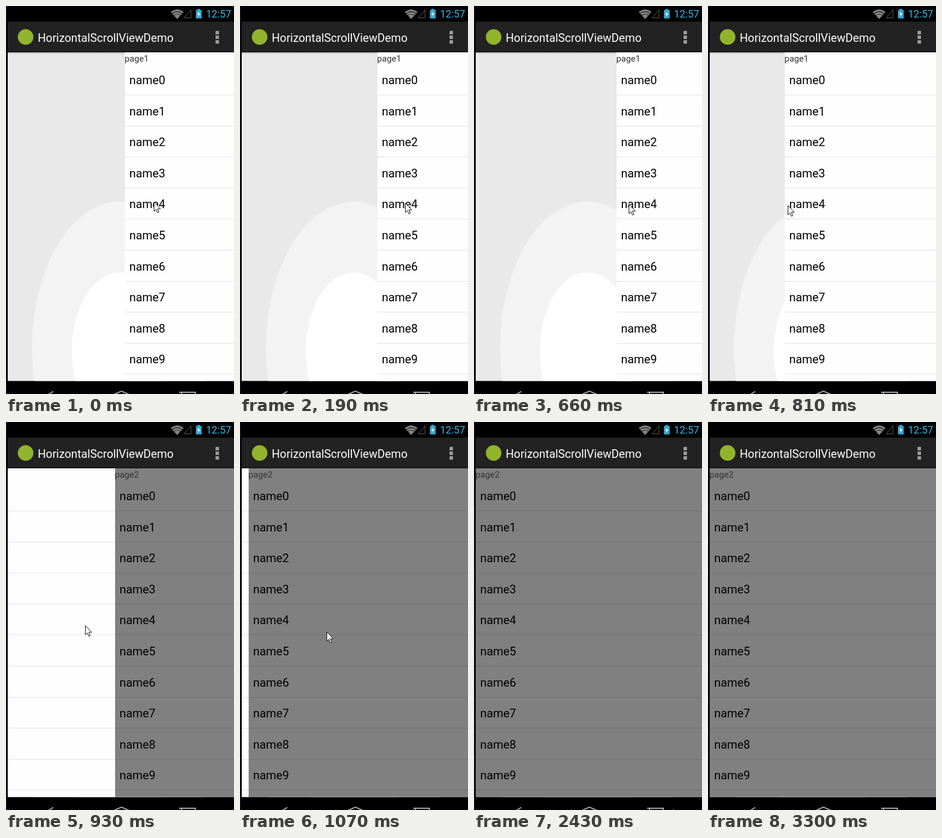
Animation of 395 by 670 pixels, one loop 3360 ms. Source, as an HTML page:

```html
<!DOCTYPE html>
<html lang="en">
<head>
<meta charset="utf-8">
<title>Horizontal scroll demo</title>
<style>
  html, body { margin: 0; width: 100%; height: 100%; overflow: hidden; background: #000; }
  svg { display: block; width: 395px; height: 670px; font-family: Roboto, "Noto Sans", sans-serif; }
  .title { font-size: 19.8px; fill: #fff; }
  .clock { font-size: 17.5px; fill: #33b5e5; }
  .label { font-size: 15.2px; fill: #333; }
  .name { font-size: 20.3px; fill: #000; }
  .nav { fill: none; stroke: #a6a6a6; stroke-width: 2; }
</style>
</head>
<body>
<svg viewBox="0 0 395 670">
  <defs>
    <clipPath id="content"><rect x="3" y="80" width="392" height="567.5"/></clipPath>
    <linearGradient id="shade" x2="0" y2="1">
      <stop stop-opacity=".25"/><stop offset="1" stop-opacity="0"/>
    </linearGradient>
  </defs>
  <rect width="395" height="670"/>
  <rect id="edge" width="1" height="670" fill="#101c38"/>

  <!-- status bar -->
  <path d="M285.5 10.5Q296.500 1.500 307.500 10.500L296.500 22.500Z" fill="#858585"/>
  <path d="M287.500 13.300Q296.500 5.800 305.500 13.300M290.500 16.500Q296.500 11.500 302.500 16.500" fill="none" stroke="#222" stroke-width="1.200"/>
  <path d="M308.500 20.500H320.500V6.500Z" fill="none" stroke="#5c5c5c"/>
  <path d="M331.500 5H336.500V7H339V21.500H329V7H331.500Z" fill="#33a5d0"/>
  <path d="M335 9L331 14.500H333.700L332.700 19L337 13H334.200Z" fill="#e8f6fc"/>
  <text class="clock" x="346.500" y="20">12:57</text>

  <!-- action bar -->
  <rect x="3" y="27" width="392" height="52" fill="#222"/>
  <rect x="3" y="78" width="392" height="2" fill="#161616"/>
  <circle cx="34" cy="53.500" r="13.500" fill="#91b42c"/>
  <text class="title" x="55" y="61.500">HorizontalScrollViewDemo</text>
  <path d="M363 43h6v6h-6zM363 51h6v6h-6zM363 59h6v6h-6z" fill="#9a9a9a"/>

  <!-- drawer and sliding pages -->
  <g clip-path="url(#content)">
    <rect x="3" y="80" width="392" height="568" fill="#e9e9e9"/>
    <ellipse cx="197" cy="592" rx="152" ry="254" fill="#f3f3f3"/>
    <ellipse cx="197" cy="596" rx="83" ry="136" fill="#fff"/>
    <rect x="3" y="80" width="392" height="3" fill="url(#shade)"/>
    <g id="pages"></g>
  </g>

  <!-- navigation bar -->
  <path class="nav" d="M82 665.500L70 673M183 672.500L200 665L217 672.500M300 667H328V671M304 671V668"/>

  <path id="cursor" d="M.5 .5V16.500L4 13.200L6.500 19L9 18L6.500 12.200H11.500Z" fill="#fff" stroke="#111" stroke-linejoin="round"/>
</svg>
<script>
const LOOP = 3360, PAGE_WIDTH = 392, ROW = 53.6;
const FLING = { start: 840, length: 325, from: 103, to: 3 - PAGE_WIDTH };
const $ = id => document.getElementById(id);

function add(parent, tag, attrs, text = '') {
  const node = document.createElementNS('http://www.w3.org/2000/svg', tag);
  for (const key in attrs) node.setAttribute(key, attrs[key]);
  node.textContent = text;
  return parent.appendChild(node);
}

function addPage(index, fill, line) {
  const page = add($('pages'), 'g', { transform: `translate(${index * PAGE_WIDTH} 0)` });
  add(page, 'rect', { y: 80, width: PAGE_WIDTH, height: 568, fill });
  add(page, 'text', { class: 'label', x: -0.5, y: 96 }, `page${index + 1}`);
  for (let i = 0; i < 10; i++) {
    add(page, 'text', { class: 'name', x: 7.7, y: 135 + i * ROW }, `name${i}`);
    add(page, 'rect', { y: Math.round(153 + i * ROW), width: PAGE_WIDTH, height: 1, fill: line });
  }
}
addPage(0, '#fefefe', '#e2e2e2');
addPage(1, '#808080', '#727272');

// Tracks are lists of [time, ...values], joined linearly.
const dragTrack = [[0, 206], [360, 269], [420, 279], [570, 279], [640, 262], [810, 133], [840, 103]];
const cursorTrack = [
  [0, 255.5, 337.5], [360, 316.5, 341.5], [420, 327, 342], [570, 327, 342], [640, 285, 342],
  [810, 137.5, 343.5], [870, 132, 346], [1070, 149.5, 362], [1130, 150, 364], [1340, 160, 382],
  [1640, 173.5, 416], [1790, 201, 514], [1870, 189.5, 503.5], [2010, 189.5, 503.5],
  [2180, 230, 560], [2300, 270, 614], [2430, 350, 671]
];

function sample(track, t) {
  const next = track.findIndex(point => point[0] > t);
  if (next < 0) return track[track.length - 1].slice(1);
  const a = track[next - 1], b = track[next];
  const p = (t - a[0]) / (b[0] - a[0]);
  return a.slice(1).map((v, i) => v + (b[i + 1] - v) * p);
}

function pageX(t) {
  if (t < FLING.start) return sample(dragTrack, t)[0];
  const rest = 1 - Math.min(1, (t - FLING.start) / FLING.length);
  return FLING.to + (FLING.from - FLING.to) * rest ** 3;
}

function step(t) {
  const base = t < 1070 ? 0 : 1070;
  return base + Math.floor((t - base) / 30) * 30;
}

function draw(now) {
  const time = now % LOOP, t = step(time);
  const [x, y] = sample(cursorTrack, t);
  $('pages').setAttribute('transform', `translate(${Math.round(pageX(t))} 0)`);
  $('cursor').setAttribute('transform', `translate(${Math.round(x)} ${Math.round(y)})`);
  $('edge').setAttribute('visibility', time < 3300 ? 'visible' : 'hidden');
}

const start = performance.now();
function frame() {
  draw(performance.now() - start);
  requestAnimationFrame(frame);
}
frame();
</script>
</body>
</html>
```
